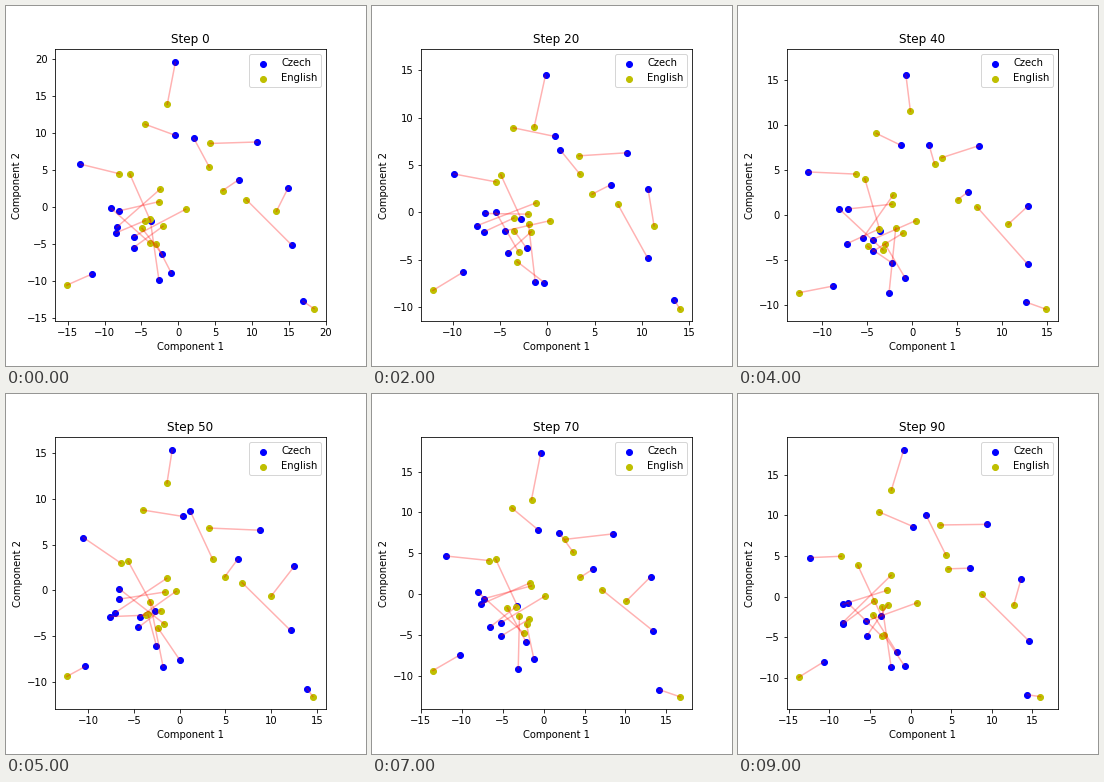
Animation, 360 px wide and 360 px high, one loop 10000 ms. Source, as a matplotlib script:

```python
import matplotlib.pyplot as plt
import numpy as np
from matplotlib.animation import FuncAnimation

FRAMES = 10
STEP = 10
JITTER = 0.6

# Key pairs around the rim: Czech x, y, English x, y
RIM = np.array([
    [-0.4, 19.6, -1.5, 13.9], [-0.4, 9.7, -4.5, 11.2],
    [-13.3, 5.8, -8.0, 4.5], [2.1, 9.3, 4.2, 5.4],
    [10.7, 8.8, 4.3, 8.6], [8.2, 3.7, 6.0, 2.2],
    [14.9, 2.6, 13.3, -0.6], [15.4, -5.2, 9.2, 1.0],
    [16.9, -12.8, 18.4, -13.8], [-11.7, -9.1, -15.1, -10.6],
]).reshape(-1, 2, 2)


def core(n):
    """Crowded pairs left of the middle, English a little above Czech."""
    rng = np.random.default_rng(4)
    centres = [[-4.5, -3.5], [-3.0, -2.3]]
    return rng.normal(centres, [2.4, 3.0], (n, 2, 2))


START = np.concatenate([RIM, core(10)])


def cloud(i):
    """Wide at first, then pulled in, shaken and slowly growing again."""
    if i == 0:
        return START
    noise = np.random.default_rng(i).normal(0, JITTER, START.shape)
    return START * (0.71 + 0.023 * i) + noise


fig, ax = plt.subplots(figsize=(5, 5), dpi=72)
fig.subplots_adjust(left=0.125, right=0.9, bottom=0.125, top=0.88)


def draw(i):
    ax.clear()
    pts = cloud(i)
    czech, english = pts[:, 0], pts[:, 1]
    ax.scatter(*czech.T, c="b", label="Czech")
    ax.scatter(*english.T, c="y", label="English")
    for pair in pts:
        ax.plot(*pair.T, c="r", alpha=0.3)
    ax.axis("square")
    ax.set_title(f"Step {i * STEP}")
    ax.set_xlabel("Component 1")
    ax.set_ylabel("Component 2")
    ax.legend(loc="upper right")


anim = FuncAnimation(fig, draw, frames=FRAMES, interval=1000,
                     repeat=True, repeat_delay=0)
plt.show()
```
